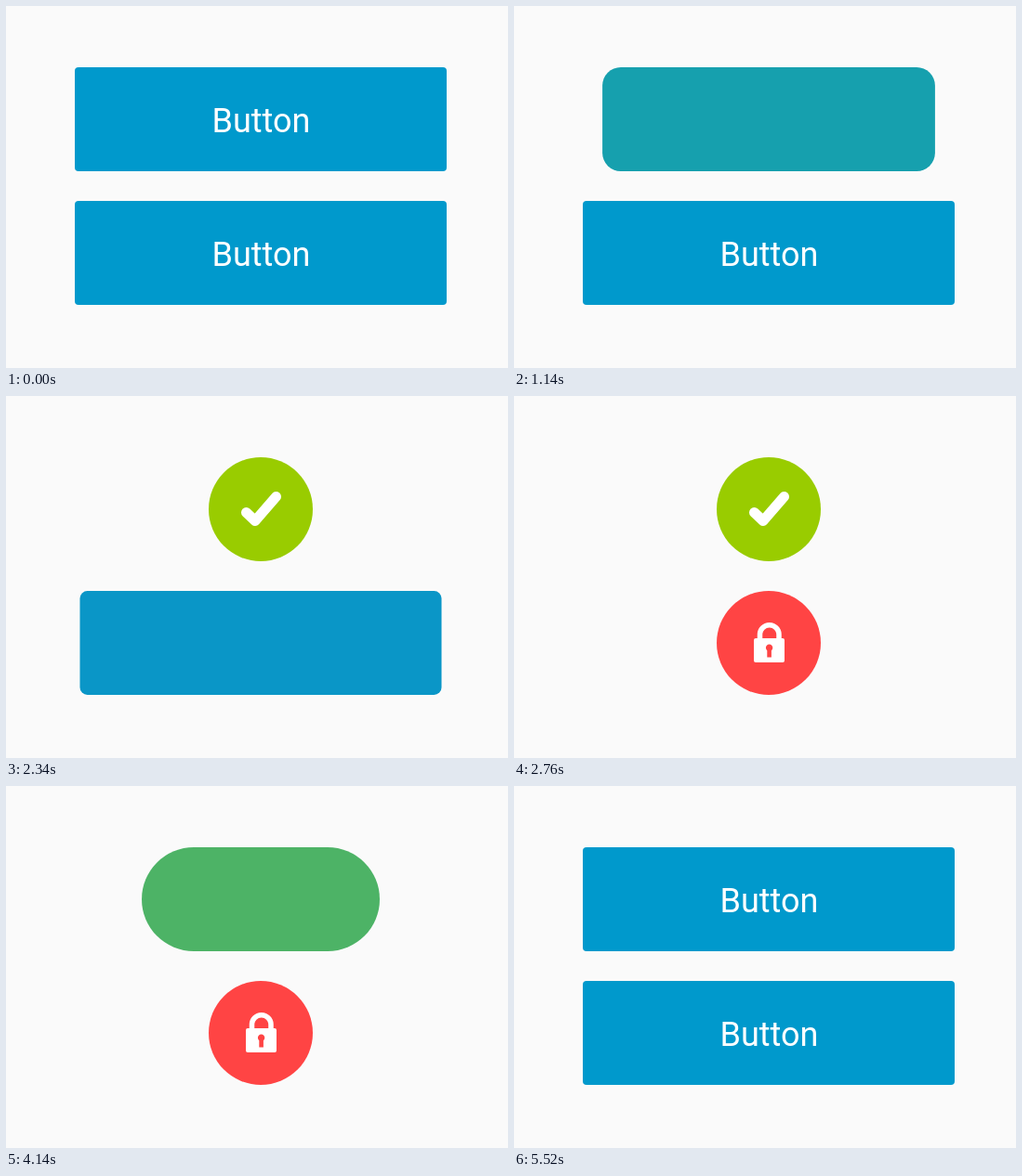
An HTML page that plays this animation: 540 by 390 pixels, repeating every 6360 ms.

```html
<!DOCTYPE html>
<html lang="en">
<head>
<meta charset="utf-8">
<title>Morphing buttons</title>
<style>
  html, body { margin: 0; width: 100%; height: 100%; overflow: hidden; background: #fafafa; }
  svg { display: block; width: 100vw; height: 100vh; }
  text { font: 36px Roboto, sans-serif; fill: #fff; text-anchor: middle; }
</style>
</head>
<body>
<svg viewBox="0 0 540 390">
  <g id="top" transform="translate(274 122)">
    <rect class="shape" y="-56" height="112"/>
    <text class="label" x="0.5" y="14">Button</text>
    <path class="icon" d="M-15.5 3.5L-6 12.5L16.5-13.5" fill="none" stroke="#fff"
      stroke-width="11" stroke-linecap="round" stroke-linejoin="round"/>
  </g>
  <g id="bottom" transform="translate(274 266)">
    <rect class="shape" y="-56" height="112"/>
    <text class="label" x="0.5" y="14">Button</text>
    <g class="icon">
      <path d="M-9.5-4V-9a10.25 10.25 0 0 1 20.5 0V-4" fill="none" stroke="#fff" stroke-width="5.5"/>
      <path fill="#fff" fill-rule="evenodd" d="M-14-5H15a2 2 0 0 1 2 2V19a2 2 0 0 1-2 2H-14a2 2 0 0 1-2-2V-3a2 2 0 0 1 2-2Z
        M-1.7 8.2V15.5H2.9V8.2A3.7 3.7 0 1 0-1.7 8.2Z"/>
    </g>
  </g>
</svg>
<script>
const LOOP = 6360, STEP = 60, MORPH = 480;
const BLUE = [0, 153, 204], BLUE_DARK = [0, 113, 155];

const buttons = [
  { id: 'top', color: [153, 204, 0], dark: [122, 163, 0],
    press: 840, close: 1020, pressAgain: 3720, open: 3900 },
  { id: 'bottom', color: [255, 68, 68], dark: [204, 58, 58],
    press: 2160, close: 2280, pressAgain: 4920, open: 5040 }
];
for (const b of buttons) {
  const find = name => document.querySelector(`#${b.id} .${name}`);
  b.shape = find('shape');
  b.label = find('label');
  b.icon = find('icon');
}

const mix = (a, b, k) => a + (b - a) * k;
const progress = (t, start) => Math.min(1, Math.max(0, (t - start) / MORPH));
const ease = p => (1 - Math.cos(Math.PI * p)) / 2;
const show = (el, on) => el.setAttribute('visibility', on ? 'visible' : 'hidden');

function drawButton(b, t) {
  const roundness = ease(progress(t, b.close)) - ease(progress(t, b.open));
  const width = mix(400, 112, roundness);
  let color = BLUE.map((c, i) => Math.round(mix(c, b.color[i], roundness)));
  if (t >= b.press && t < b.close) color = BLUE_DARK;
  if (t >= b.pressAgain && t < b.open) color = b.dark;

  b.shape.setAttribute('x', -width / 2);
  b.shape.setAttribute('width', width);
  b.shape.setAttribute('rx', Math.min(56, mix(4, 112, roundness)));
  b.shape.setAttribute('fill', `rgb(${color})`);
  show(b.label, t < b.close || t >= b.open + MORPH);
  show(b.icon, t >= b.close + MORPH && t < b.open);
}

function draw(ms) {
  const t = Math.floor((ms % LOOP) / STEP) * STEP;
  for (const b of buttons) drawButton(b, t);
}

const start = performance.now();
function tick() {
  draw(performance.now() - start);
  requestAnimationFrame(tick);
}
tick();
</script>
</body>
</html>
```
